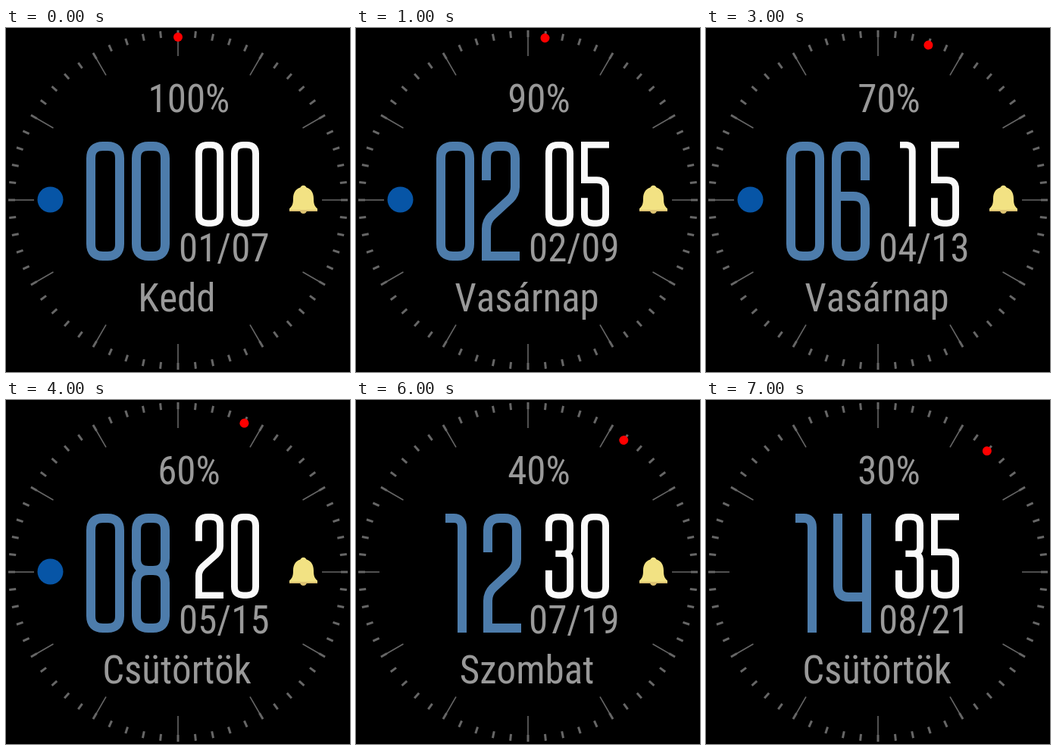
An HTML page for the animation above (8 s loop, 454 by 454 pixels).

```html
<!DOCTYPE html>
<html lang="hu">
<head>
<meta charset="utf-8">
<title>Watch face</title>
<style>
  html, body { margin: 0; width: 100%; height: 100%; overflow: hidden; background: #000; }
  svg { display: block; width: 100vw; height: 100vh; }
  text {
    font: 51px "Roboto Condensed", Roboto, sans-serif;
    font-stretch: 75%;
    font-kerning: none;
    fill: #999;
  }
  .mid { text-anchor: middle; }
  .digits { fill: none; stroke-width: 12; }
</style>
</head>
<body>
<svg viewBox="0 0 454 454">
  <rect width="454" height="454"/>
  <g id="ticks" stroke="#666"></g>
  <circle id="link" cx="58.5" cy="226.5" r="17" fill="#0755a6"/>
  <g id="bell" fill="#f2e283">
    <circle cx="392.5" cy="212" r="4.2"/>
    <circle cx="392.5" cy="240.5" r="4.6" fill="#dcc272"/>
    <path d="M392.5 210C402 210 406 217 406 225C406 233 407.5 235 411 238.5V242H374V238.5C377.5 235 379 233 379 225C379 217 383 210 392.5 210Z"/>
    <path d="M374 241H411" stroke="#dcc272" stroke-width="2"/>
  </g>
  <text id="battery" class="mid" x="241.5" y="110.5"></text>
  <text id="date" x="228" y="307.5"></text>
  <text id="day" class="mid" x="225.5" y="373.5"></text>
  <g id="hour" class="digits" stroke="#4d7cab"></g>
  <g id="minute" class="digits" stroke="#fafafa"></g>
  <circle id="second" cx="227" cy="12" r="6" fill="#f00"/>
</svg>
<script>
const $ = id => document.getElementById(id);
const pad = n => String(n).padStart(2, '0');

// Centre lines of digits in a 50 x 157 cell
const arch = 'V22Q6 6 22 6H28Q44 6 44 22';
const bowl = 'V135Q44 151 28 151H22Q6 151 6 135';
const glyphs = {
  0: 'M6 78' + arch + bowl + 'Z',
  1: 'M0 6H11Q22 6 22 18V157',
  2: 'M6 51' + arch + 'V60Q44 69 37 76L13 98Q6 105 6 115V151H50',
  3: 'M6 51' + arch + 'V61Q44 74 32 74H18M32 74Q44 74 44 87' + bowl + 'V105',
  4: 'M6 0V96Q6 110 20 110H44M44 0V157',
  5: 'M50 6H6V71H28Q44 71 44 87' + bowl + 'V104',
  6: 'M44 51V22Q44 6 28 6H22Q6 6 6 22V135Q6 151 22 151H28Q44 151 44 135V88Q44 72 28 72H6',
  8: 'M22 75Q6 75 6 59' + arch + 'V59Q44 75 28 75H22M28 75Q44 75 44 91' + bowl + 'V91Q6 75 22 75'
};

const digit = (d, x, sx, sy) =>
  `<path d="${glyphs[d]}" transform="translate(${x} 150) scale(${sx} ${sy})"/>`;

const tick = (angle, inner, width) =>
  `<path d="M227 3V${227 - inner}" stroke-width="${width}" transform="rotate(${angle} 227 227)"/>`;

let marks = '';
for (let i = 0; i < 60; i++) {
  marks += tick(i * 6, 215, 3);
  if (i % 5 === 0) marks += tick(i * 6, i === 45 ? 196 : 190, 1.6);
}
$('ticks').innerHTML = marks + '<path id="stub" d="M31 227H37" stroke-width="1.6"/>';

const days = ['Vasárnap', 'Hétfő', 'Kedd', 'Szerda', 'Csütörtök', 'Péntek', 'Szombat'];

function show(k) {
  const h = pad(k * 2), m = pad(k * 5), date = 7 + k * 2;
  const one = h[0] === '1';
  $('hour').innerHTML = digit(h[0], one ? 118 : 106, 1, 1) + digit(h[1], one ? 168 : 166, 1, 1);
  $('minute').innerHTML = digit(m[0], m[0] === '1' ? 256 : 250, .74, .713) + digit(m[1], 297, .74, .713);
  $('battery').textContent = 100 - k * 10 + '%';
  $('date').textContent = pad(k + 1) + '/' + pad(date);
  $('day').textContent = days[new Date(2025, k, date).getDay()];
  $('second').setAttribute('transform', `rotate(${k * 6} 227 227)`);
  const linked = k < 5 ? 'visible' : 'hidden';
  $('link').style.visibility = $('stub').style.visibility = linked;
  $('bell').style.visibility = k < 7 ? 'visible' : 'hidden';
}

let last = -1;
function loop() {
  const k = Math.floor(performance.now() / 1000) % 8;
  if (k !== last) show(last = k);
  requestAnimationFrame(loop);
}
loop();
</script>
</body>
</html>
```
